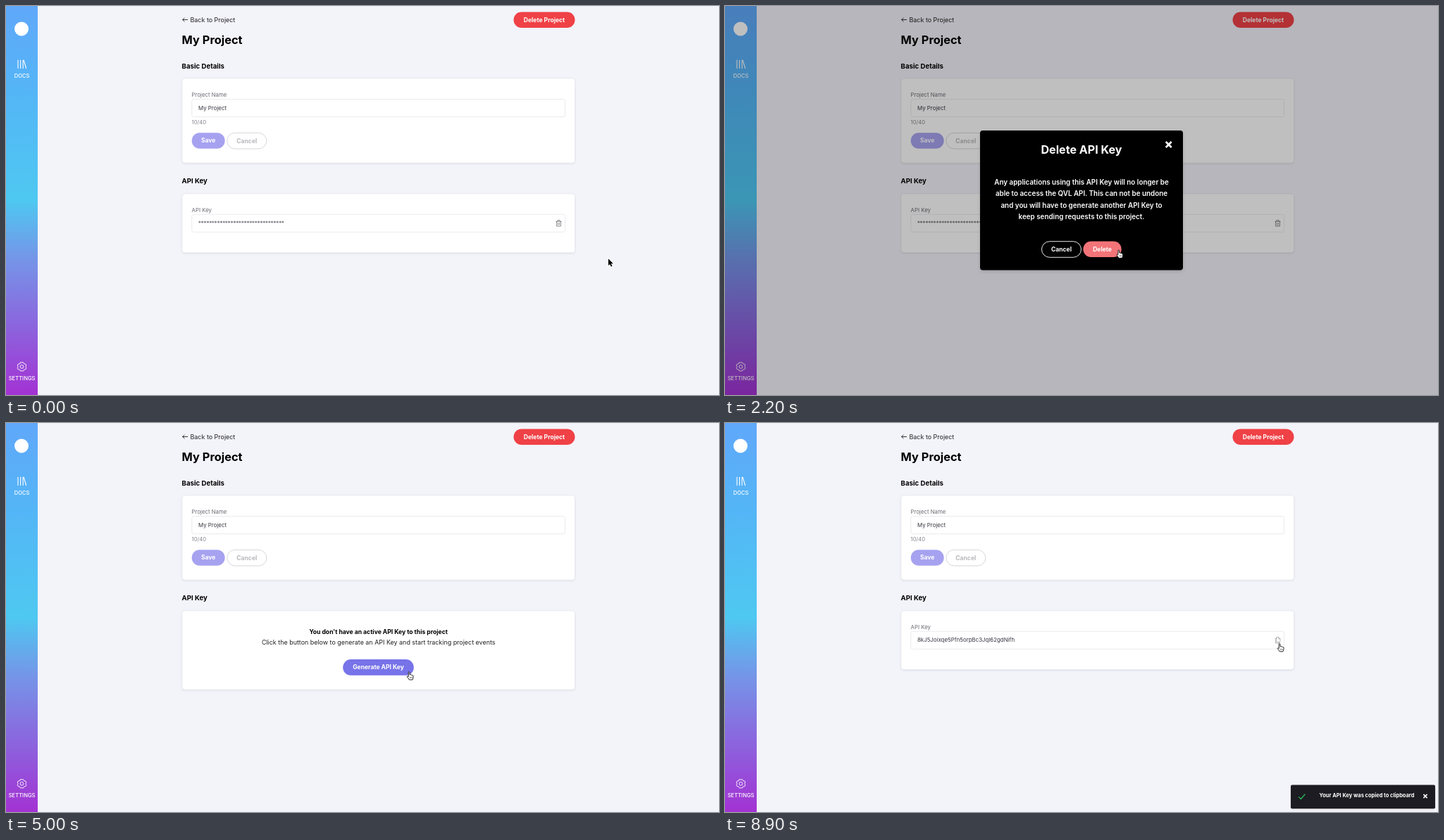
Animation of 1012x553 px, one loop 9000 ms. Source, as an HTML page:

```html
<!DOCTYPE html>
<html lang="en">
<head>
<meta charset="utf-8">
<title>Project settings</title>
<style>
  html, body { margin: 0; width: 100%; height: 100%; overflow: hidden; background: #f3f3fa; }
  svg { display: block; font-family: Inter, sans-serif; font-optical-sizing: none; }
  .line { fill: none; stroke-linecap: round; stroke-linejoin: round; }
</style>
</head>
<body>
<svg id="stage" width="1012" height="553" viewBox="0 0 1012 553">
  <defs>
    <linearGradient id="side" x2="0" y2="1">
      <stop offset="0" stop-color="#60a8fa"/>
      <stop offset=".22" stop-color="#54b5f6"/>
      <stop offset=".5" stop-color="#4ec8f1"/>
      <stop offset=".65" stop-color="#7595e8"/>
      <stop offset="1" stop-color="#a332d3"/>
    </linearGradient>
    <filter id="soft" x="-10%" y="-10%" width="120%" height="130%">
      <feDropShadow dx="0" dy=".8" stdDeviation=".8" flood-opacity=".12"/>
    </filter>
    <filter id="deep" x="-10%" y="-10%" width="120%" height="130%">
      <feDropShadow dx="0" dy="2" stdDeviation="2.5" flood-opacity=".12"/>
    </filter>
  </defs>
</svg>
<script>
const RED = '#ef4146', RED_HOVER = '#f37478', RED_BUSY = '#a12d30';
const INK = '#363640', GREY = '#6c6c74', DIMMED = '#adadad';
const stage = document.getElementById('stage');

// Markup helpers
const text = (x, y, size, weight, fill, str, anchor = 'start') =>
  `<text x="${x}" y="${y}" font-size="${size}" font-weight="${weight}" fill="${fill}" text-anchor="${anchor}">${str}</text>`;
const centered = (x, y, size, weight, fill, str) => text(x, y, size, weight, fill, str, 'middle');
const rect = (x, y, w, h, r, fill, extra = '') =>
  `<rect x="${x}" y="${y}" width="${w}" height="${h}" rx="${r}" fill="${fill}" ${extra}/>`;
const line = (d, stroke, width) =>
  `<path class="line" d="${d}" stroke="${stroke}" stroke-width="${width}"/>`;
const group = (id, content, extra = '') => `<g id="${id}" ${extra}>${content}</g>`;
const card = (y, h) => rect(250, y, 557.5, h, 4, '#fff', 'filter="url(#soft)" stroke="#e6e7ed" stroke-width=".6"');
const input = y => rect(263.8, y, 529.8, 25, 2.5, '#fff', 'stroke="#e8e9ed" stroke-width=".9"');
const pill = (x, y, w, fill, label, color = '#fff', extra = '') =>
  rect(x, y, w, 22.6, 11.3, fill, extra) + centered(x + w / 2, y + 14.1, 8.55, 700, color, label);
const outlined = color => `stroke="${color}" stroke-width=".9"`;
const cross = (x, y, r, width) =>
  `<path d="M${x - r} ${y - r}l${2 * r} ${2 * r}m0 ${-2 * r}l${-2 * r} ${2 * r}" stroke="#fff" stroke-width="${width}"/>`;
const spinner = (id, x, y) => {
  let spokes = '';
  for (let i = 0; i < 8; i++)
    spokes += `<path d="M-.8 -5.6h1.6" stroke="#d8c4c8" stroke-width="1.5" stroke-linecap="round" transform="rotate(${i * 45})"/>`;
  return `<g transform="translate(${x} ${y})">${group(id, spokes)}</g>`;
};

const sidebar =
  rect(0, 0, 45, 553, 0, 'url(#side)') +
  '<circle cx="22" cy="32.5" r="10" fill="#fff"/>' +
  line('M17 77V88.5M20.6 77V88.5M24.2 77V88.5M25.2 77.2L28.6 88.5', '#fff', 1.1) +
  centered(22.6, 101.8, 7.55, 500, '#fff', 'DOCS') +
  line('M20.4 506.8h4.2l1 1.9 2.2.3 1 2-1 1.8 1 1.8-1 2-2.2.3-1 1.9h-4.2l-1-1.9-2.2-.3-1-2 1-1.8-1-1.8 1-2 2.2-.3z', '#fff', .9) +
  '<circle cx="22.5" cy="512.8" r="2.4" fill="none" stroke="#fff" stroke-width=".9"/>' +
  centered(22.6, 532, 7.6, 500, '#fff', 'SETTINGS');

const details =
  line('M257.6 19.5H250.8M253.2 17L250.7 19.5L253.2 22', '#222', .9) +
  text(261.5, 22.6, 8.95, 400, '#222', 'Back to Project') +
  pill(720.5, 8.4, 87, RED, 'Delete Project') +
  text(249.6, 54.3, 16.4, 700, '#000', 'My Project') +
  text(249.6, 88.5, 9.65, 700, '#000', 'Basic Details') +
  card(103, 120) +
  text(263.6, 128.8, 7.8, 400, GREY, 'Project Name') +
  input(132.6) +
  text(273, 147.7, 7.9, 400, INK, 'My Project') +
  text(263.6, 167.9, 7.7, 400, '#85858d', '10/40') +
  pill(263.7, 180.2, 47, '#a6a2f0', 'Save') +
  pill(313.8, 180.4, 56, '#fff', 'Cancel', '#b9b9bd', outlined('#d3d3d8')) +
  text(249.6, 252.4, 9.65, 700, '#000', 'API Key');

const keyCard =
  card(267, 83.5) + text(263.6, 292.6, 7.8, 400, GREY, 'API Key') + input(296.3) +
  group('hiddenKey', `<text x="273" y="311.2" font-size="7.62" fill="${INK}" font-family="DejaVu Sans, sans-serif">${'*'.repeat(32)}</text>`) +
  group('shownKey', text(273, 311.3, 7.88, 400, INK, '8kJ5Joixqe5Pfn5orpBc3Jql62gdNifh')) +
  group('trash', line('M780.8 306.3h7.4M782.9 306.1v-1.5h3.2v1.5M781.5 306.4v6.6h6v-6.6M783.5 308.4v2.8M785.5 308.4v2.8', '#606068', .7)) +
  group('copy', line('M783 304.6h2.8l2.2 2.2v4.6h-5zM785.7 304.7v2.2h2.2M782.8 306.2h-1.4v6.8h5v-1.4', '#606068', .75));

const emptyCard =
  card(267, 112) +
  centered(528.7, 300.4, 8.6, 700, '#000', "You don't have an active API Key to this project") +
  centered(528.7, 315, 8.93, 400, '#222', 'Click the button below to generate an API Key and start tracking project events') +
  group('generate', pill(478.2, 336.1, 100.6, '#4a45e2', 'Generate API Key')) +
  group('generating', rect(508.3, 336.1, 40.4, 22.6, 11.3, '#4a45e2') + spinner('spinB', 528.5, 347.4), 'opacity=".6"');

const warning = [
  'Any applications using this API Key will no longer be',
  'able to access the QVL API. This can not be undone',
  'and you will have to generate another API Key to',
  'keep sending requests to this project.'
].map((row, i) => centered(506, 253.7 + i * 16.5, 9.85, 600, '#fff', row)).join('');

const modal =
  rect(0, 0, 1012, 553, 0, '#000', 'opacity=".25"') +
  rect(362, 177, 288, 198.6, 4, '#000', 'filter="url(#deep)"') +
  centered(506, 209.6, 16.1, 700, '#fff', 'Delete API Key') +
  group('close', cross(629.7, 197, 4, 2.6)) + warning +
  group('choices', pill(449.5, 334.7, 56, '#000', 'Cancel', '#fff', outlined('#fff')) +
    group('confirm', pill(508.4, 334.5, 54.3, RED, 'Delete'))) +
  group('deleting', pill(456.4, 334.7, 56, '#000', 'Cancel', DIMMED, outlined(DIMMED)) +
    rect(515.5, 334.5, 40.6, 22.6, 11.3, RED_BUSY) + spinner('spinA', 535.8, 345.8));

const toast =
  rect(803, 514.5, 205, 33.7, 2, '#1f1f21', 'filter="url(#soft)"') +
  line('M814.5 531.6L817.4 534.5L823 528', '#2fb457', 1.3) +
  text(843.6, 531.6, 7.45, 700, '#fff', 'Your API Key was copied to clipboard') +
  cross(994, 530.5, 2.6, 1.6);

const pointer = group('pointer',
  group('arrow', '<path d="M0 0V9.7L2.2 7.6L3.8 11.2L5.5 10.4L3.9 7H7Z" fill="#000" stroke="#fff" stroke-width="2" paint-order="stroke"/>') +
  group('hand', '<path d="M.2 2Q.1 .9 1 .9T2 2V5Q3.2 4.5 3.8 5.4Q5 5 5.5 5.9Q7 5.7 7 7.2V9Q6.8 10.5 6 12.3H1.3Q-.2 9.8-1.8 8Q-1.8 6.5.3 7.8Z" fill="#fff" stroke="#111" stroke-width=".9" stroke-linejoin="round"/><path d="M2.3 8.2v2M3.8 8.2v2M5.2 8.2v2" stroke="#111" stroke-width=".5"/>'));

stage.insertAdjacentHTML('beforeend', sidebar + details + group('keyCard', keyCard) + group('emptyCard', emptyCard) +
  group('modal', modal) + group('toast', toast) + pointer);

// Pointer stops: time, x, y
const path = [
  [0, 854.9, 359.3], [800, 786.8, 311], [1300, 786.8, 311], [2300, 551, 347], [2900, 551, 347],
  [3000, 559.3, 348.6], [3100, 590.7, 367.5], [3300, 628, 384], [3600, 638, 389], [4100, 638, 389],
  [5000, 571, 352.7], [6600, 571, 352.7], [7500, 785.5, 312], [7600, 785.5, 312], [7700, 786, 312.6], [9000, 786, 312.6]
];
const el = id => document.getElementById(id);
const clamp = v => Math.max(0, Math.min(1, v));
const show = (id, on) => el(id).style.display = on ? '' : 'none';
const fadeTo = (t, start, from, to) => from + (to - from) * clamp((t - start) / 200);

function pointerAt(t) {
  const i = Math.max(1, path.findIndex(stop => stop[0] > t));
  const [t0, x0, y0] = path[i - 1], [t1, x1, y1] = path[i];
  const u = clamp((t - t0) / (t1 - t0)), e = u * u * (3 - 2 * u);
  return [x0 + (x1 - x0) * e, y0 + (y1 - y0) * e];
}

function render(t) {
  const during = (a, b) => t >= a && t < b;
  const loading = during(2400, 3100), empty = during(3100, 6000), revealed = t >= 6000;

  show('keyCard', !empty);
  show('emptyCard', empty);
  show('hiddenKey', !revealed);
  show('trash', !revealed);
  show('shownKey', revealed);
  show('copy', revealed);
  el('trash').style.opacity = during(700, 1100) ? .55 : 1;
  el('copy').style.opacity = t >= 7400 ? .55 : 1;

  show('generate', t < 5600);
  show('generating', t >= 5600);
  el('generate').querySelector('rect').setAttribute('opacity', fadeTo(t, 4700, 1, .75));

  show('modal', during(1000, 3100));
  el('modal').style.opacity = t < 1100 ? .5 : 1;
  show('choices', !loading);
  show('deleting', loading);
  el('close').style.opacity = loading ? .68 : 1;
  el('confirm').querySelector('rect').setAttribute('fill', during(2200, 2400) ? RED_HOVER : RED);
  for (const id of ['spinA', 'spinB']) el(id).setAttribute('transform', `rotate(${t * .36})`);

  show('toast', t >= 7900);

  const hand = during(700, 1100) || during(2200, 2400) || during(4800, 5600) || t >= 7400;
  show('hand', hand);
  show('arrow', !hand);
  el('pointer').setAttribute('transform', `translate(${pointerAt(t)})`);
}

const begin = performance.now();
function tick() {
  const t = (performance.now() - begin) % 9000;
  render(Math.floor(t / 100) * 100); // the picture advances ten times a second
  requestAnimationFrame(tick);
}
tick();
</script>
</body>
</html>
```
